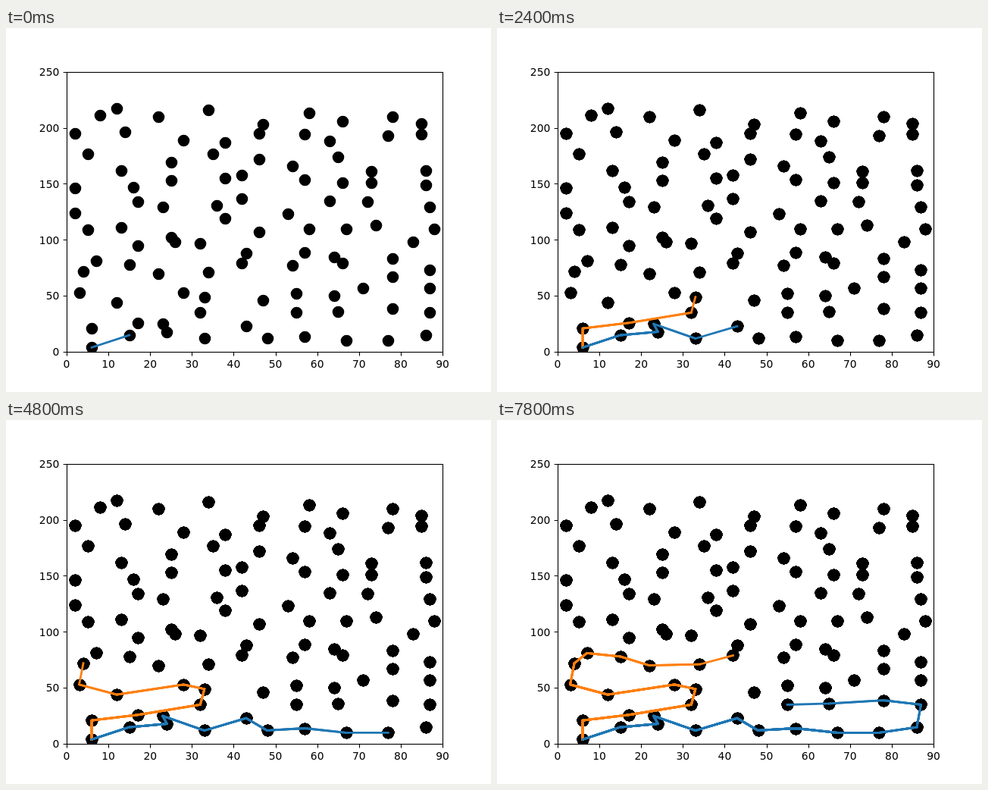
Write an HTML page with a canvas that moves like this. It is 640x480 px and loops after 8000 ms.

```html
<!DOCTYPE html>
<html>
<head>
<meta charset="utf-8">
<style>
html, body { margin: 0; width: 100%; height: 100%; overflow: hidden; background: #fff; }
canvas { display: block; }
</style>
</head>
<body>
<canvas id="plot" width="640" height="480"></canvas>
<script>
const ctx = document.getElementById('plot').getContext('2d');
const LOOP = 8000, STEP = 300;

const routes = [
  { color: '#1f77b4', points: [
    [6, 4], [15, 15], [24, 18], [23, 25], [33, 12], [43, 23], [48, 12], [57, 14],
    [67, 10], [77, 10], [86, 15], [87, 35], [78, 39], [65, 36], [55, 35]] },
  { color: '#ff7f0e', points: [
    [6, 4], [6, 21], [17, 26], [32, 35], [33, 49], [28, 53], [12, 44], [3, 53],
    [4, 72], [7, 81], [15, 78], [22, 70], [34, 71], [42, 79]] }
];

// Points not visited by either route
const left = [
  [2, 195], [8, 211], [12, 217], [14, 196], [22, 210], [34, 216], [5, 177], [28, 189],
  [38, 187], [35, 177], [25, 169], [13, 162], [25, 153], [38, 155], [42, 158], [2, 146],
  [16, 147], [17, 134], [23, 129], [36, 131], [42, 137], [2, 124], [38, 119], [5, 109],
  [13, 111], [25, 102], [26, 98], [32, 97], [17, 95], [43, 88]];
const right = [
  [46, 195], [47, 203], [58, 213], [66, 206], [78, 210], [85, 204], [85, 194], [77, 193],
  [57, 194], [63, 188], [46, 172], [54, 166], [65, 174], [73, 161], [86, 162], [57, 154],
  [66, 151], [73, 151], [86, 149], [63, 135], [72, 134], [87, 129], [53, 123], [46, 107],
  [58, 110], [67, 110], [74, 113], [88, 110], [83, 98], [57, 89], [54, 77], [64, 85],
  [66, 79], [78, 83], [78, 67], [87, 73], [87, 57], [71, 57], [64, 50], [55, 52], [47, 46]];
const dots = [...left, ...right, ...routes[0].points, ...routes[1].points.slice(1)];

const px = x => 80 + x * 496 / 90;
const py = y => 427.2 - y * 369.6 / 250;
const snap = v => Math.round(v) + 0.5;

function drawDots() {
  ctx.fillStyle = '#000';
  for (const [x, y] of dots) {
    ctx.beginPath();
    ctx.arc(snap(px(x)), snap(py(y)), 7.8, 0, 7);
    ctx.fill();
  }
}

function drawRoute({ color, points }, segments) {
  ctx.strokeStyle = color;
  ctx.lineWidth = 2.78;
  ctx.lineCap = 'square';
  ctx.lineJoin = 'round';
  ctx.beginPath();
  for (const [x, y] of points.slice(0, segments + 1)) ctx.lineTo(px(x), py(y));
  ctx.stroke();
}

function drawAxes() {
  ctx.strokeStyle = ctx.fillStyle = '#000';
  ctx.lineWidth = 1.11;
  ctx.lineCap = 'butt';
  ctx.lineJoin = 'miter';
  ctx.font = '13.89px "DejaVu Sans", sans-serif';
  ctx.strokeRect(80.5, 58.5, 496, 369);
  ctx.beginPath();
  ctx.textAlign = 'center';
  for (let v = 0; v <= 90; v += 10) {
    const x = snap(px(v));
    ctx.moveTo(x, 427.5);
    ctx.lineTo(x, 432.4);
    ctx.fillText(v, px(v), 448);
  }
  ctx.textAlign = 'right';
  for (let v = 0; v <= 250; v += 50) {
    const y = snap(py(v));
    ctx.moveTo(80.5, y);
    ctx.lineTo(75.6, y);
    ctx.fillText(v, 70.3, Math.round(py(v) + 5.2));
  }
  ctx.stroke();
}

// Every step plots again over the last one, so edges harden as layers build up.
function draw(step) {
  ctx.fillStyle = '#fff';
  ctx.fillRect(0, 0, 640, 480);
  ctx.save();
  ctx.beginPath();
  ctx.rect(80, 58, 496, 369);
  ctx.clip();
  for (let i = 0; i <= step; i++) drawDots();
  for (let i = 0; i <= step; i++) drawRoute(routes[i % 2], (i >> 1) + 1);
  ctx.restore();
  drawAxes();
}

let shown = -1;
function tick() {
  const step = Math.floor(performance.now() % LOOP / STEP);
  if (step !== shown) draw(shown = step);
  requestAnimationFrame(tick);
}
tick();
</script>
</body>
</html>
```
